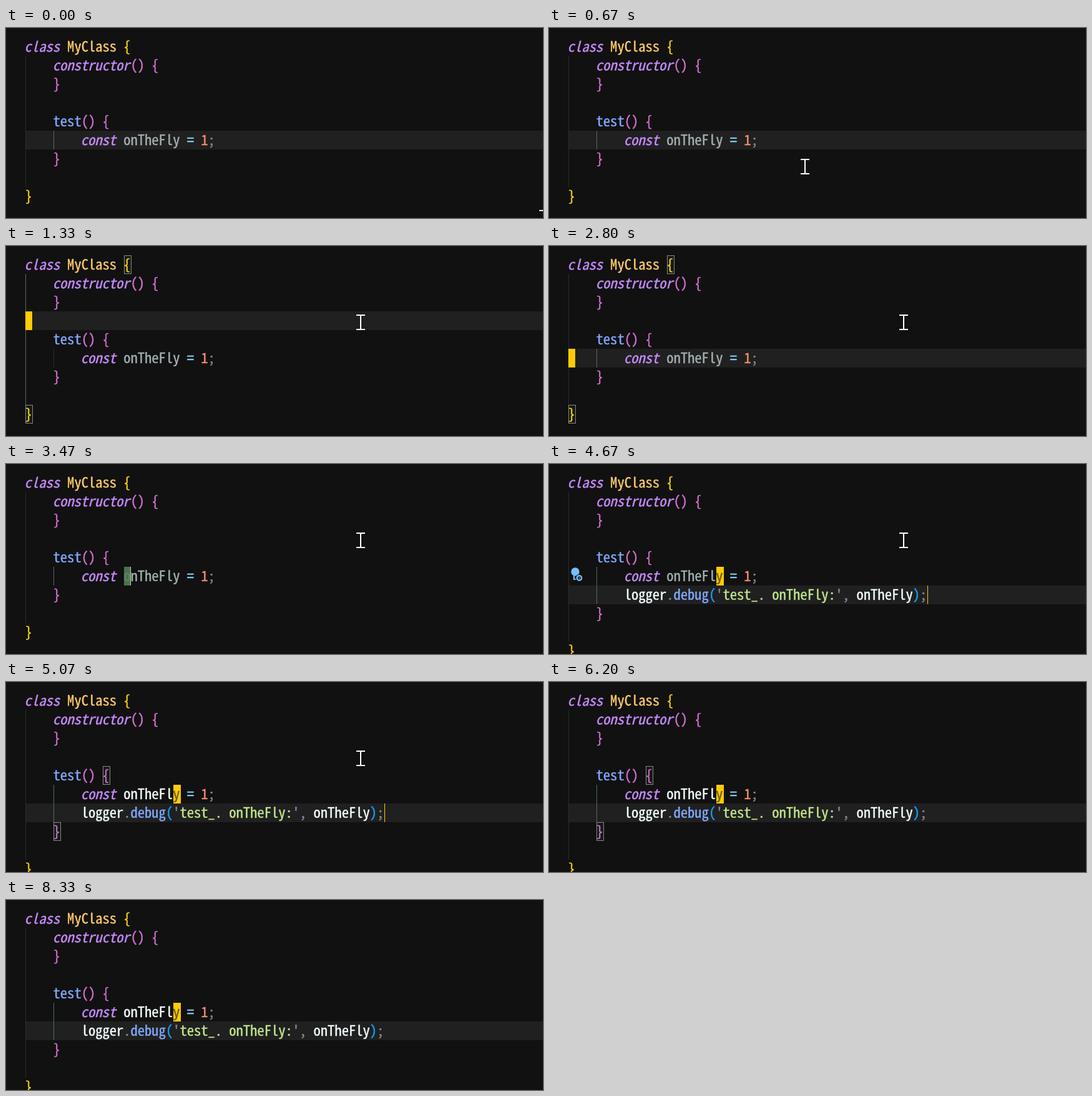
An HTML page for the animation above (8470 ms loop, 860x305 px).

```html
<!DOCTYPE html>
<html lang="en">
<head>
<meta charset="utf-8">
<title>Insert log statement</title>
<style>
html, body { margin: 0; width: 100%; height: 100%; overflow: hidden; background: #111; }
svg { display: block; width: 860px; height: 305px; }
text { white-space: pre; stroke-width: .4px; }
</style>
</head>
<body>
<svg id="stage" viewBox="0 0 860 305"></svg>
<script>
const LOOP = 8470, X0 = 31, CW = 11.27, LH = 30, TOP = 15;
const FONT = "'Noto Sans Mono CJK JP', 'Noto Sans Mono', monospace";
const stage = document.getElementById('stage');

// Pick the font size whose advance equals one editor column.
const ctx = document.createElement('canvas').getContext('2d');
ctx.font = '100px ' + FONT;
stage.style.fontFamily = FONT;
stage.style.fontSize = 100 * CW / ctx.measureText('0').width + 'px';

const C = {
  key: '#c98bff', type: '#ffcb6b', gold: '#ffd70a', pink: '#da70d6', blue: '#179fff',
  fn: '#82aaff', name: '#f4ffff', unused: '#a3b0b1', op: '#89ddff', num: '#f78c6c',
  punct: '#8a8790', str: '#c3e88d', cursor: '#ffcc00', row: '#202020',
  guide: '#2b2e2e', active: '#4f6c69'
};

const colX = c => X0 + c * CW;
const rowY = r => TOP + r * LH;
const rect = (x, y, w, h, fill) => `<rect x="${x}" y="${y}" width="${w}" height="${h}" fill="${fill}"/>`;
const block = (col, row, fill, w = 11) => rect(Math.round(colX(col)), rowY(row), w, LH, fill);
const guide = (x, from, to, on) => rect(x, rowY(from), 1, (to - from) * LH, on ? C.active : C.guide);
const box = (col, row) =>
  `<rect x="${Math.round(colX(col)) + .5}" y="${rowY(row) + .5}" width="11" height="29" fill="#141a14" stroke="#888"/>`;

// tokens: colour name or value, text, colour, text, ...
function line(row, col, ...tokens) {
  let out = '';
  for (let i = 0; i < tokens.length; i += 2) {
    const ink = tokens[i], str = tokens[i + 1], color = C[ink] || ink;
    const slant = ink === 'key';
    out += `<text x="${colX(col) - (slant ? 1.4 : .5)}" y="${rowY(row) + 23}" fill="${color}" stroke="${color}"
      ${slant ? 'font-style="italic"' : ''}>${str}</text>`;
    col += str.length;
  }
  return out;
}

// Pointer path: tick (1/15 s), x, y
const path = [[0, 861, 305], [3, 670, 250], [5, 481, 262], [6, 481, 262], [7, 400, 275], [8, 351, 268],
  [11, 440, 200], [15, 568, 123], [90, 568, 123], [91, 650, 111], [92, 815, 93]];

function pointer(t) {
  const k = Math.floor((t + 4) * 15 / 1000);
  const i = path.findIndex(p => p[0] >= k);
  if (i < 0) return '';
  const b = path[i], a = path[i - 1] || b;
  const f = a === b ? 0 : (k - a[0]) / (b[0] - a[0]);
  const x = Math.round(a[1] + (b[1] - a[1]) * f), y = Math.round(a[2] + (b[2] - a[2]) * f);
  return `<path d="M${x - 7} ${y - 12}h6l1 1l1-1h6M${x - 7} ${y + 11}h6l1-1l1 1h6M${x} ${y - 11}v21"
    fill="none" stroke="#fff" stroke-width="2"/>`;
}

const bulb = `<circle cx="42" cy="173" r="6.7" fill="#75beff"/>
  <path d="M40 178v7h5" fill="none" stroke="#75beff" stroke-width="2"/>
  <circle cx="48.5" cy="183" r="6" fill="#111"/>
  <circle cx="48.5" cy="183" r="3.7" fill="none" stroke="#75beff" stroke-width="2.4"/>
  <circle cx="48.5" cy="183" r="1" fill="#75beff"/>`;

function scene(t) {
  const during = (a, b) => t >= a && t < b;
  const logged = t >= 4670, visual = during(3470, 4670);
  const row = logged ? 6 : during(1270, 2600) ? 3 : during(2600, 2800) ? 4 : 5;
  const testEnd = logged ? 7 : 6, classEnd = testEnd + 2;
  let s = rect(0, 0, 860, 305, '#111');

  if (!visual) s += rect(32, rowY(row), 828, LH, C.row);
  s += guide(31, 1, classEnd, during(1330, 2600));
  s += guide(76, 5, testEnd, !during(1270, 2600));
  if (during(1330, 2930)) s += box(14, 0) + box(0, classEnd);
  if (during(4730, 8330)) s += box(11, 4) + box(4, testEnd);

  // Block cursor and selection
  const focus = during(1270, 1800) || during(2330, 3470);
  if (focus) s += block(t < 2930 ? 0 : t < 3270 ? 8 : 14, row, C.cursor);
  if (visual) {
    const at = t < 3930 ? 14 : 21;
    if (at > 14) s += rect(189, 165, 79, LH, '#0b4466');
    s += block(at, 5, '#4c7152') + rect(Math.round(colX(at + 1)) - 1, 165, 1, LH, '#c5d8b0');
  }
  if (logged) s += block(21, 5, C.cursor, 12);
  if (during(3530, 5070)) s += bulb;

  // Code
  const dark = '#6a5b18', selected = '#64855f';
  const name = t >= 5070 ? 'name' : during(3930, 4670) ? '#a9c2c9' : 'unused';
  const c = during(2930, 3270) ? dark : 'key';
  const o = during(3270, 3470) ? dark : during(3470, 3930) ? selected : name;
  const y = logged ? dark : t >= 3930 ? selected : name;
  s += line(0, 0, 'key', 'class', '', ' ', 'type', 'MyClass', '', ' ', 'gold', '{');
  s += line(1, 4, 'key', 'constructor', 'pink', '() {');
  s += line(2, 4, 'pink', '}');
  s += line(4, 4, 'fn', 'test', 'pink', '() {');
  s += c === 'key' ? line(5, 8, 'key', 'const') : line(5, 8, c, 'c', 'key', 'onst');
  s += line(5, 14, o, 'o', name, 'nTheFl', y, 'y', 'op', ' = ', 'num', '1', 'punct', ';');
  if (logged) {
    s += line(6, 8, 'name', 'logger', 'punct', '.', 'fn', 'debug', 'blue', '(', 'punct', "'",
      'str', 'test_. onTheFly:', 'punct', "',", 'name', ' onTheFly', 'blue', ')', 'punct', ';');
  }
  s += line(testEnd, 4, 'pink', '}') + line(classEnd, 0, 'gold', '}');

  // Thin insert cursor
  const lit = t < 5200 || during(5730, 6200) || during(6670, 7200) || during(7670, 8200);
  if (logged && lit) s += rect(606, 195, 1, LH, C.cursor);

  return s + pointer(t);
}

let shown = '';
function tick(now) {
  const next = scene(now % LOOP);
  if (next !== shown) stage.innerHTML = shown = next;
  requestAnimationFrame(tick);
}
tick(performance.now());
</script>
</body>
</html>
```
